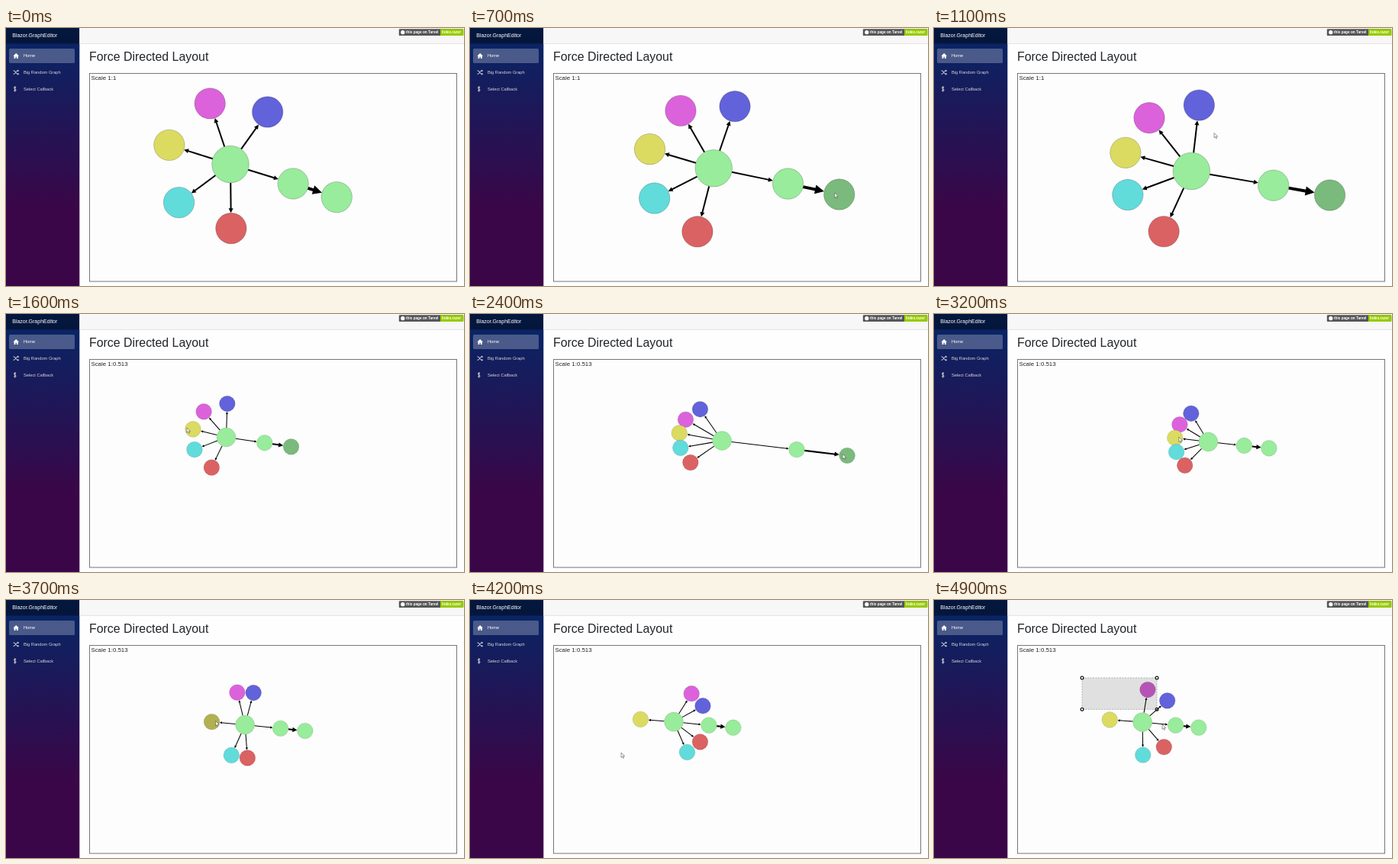
Write an HTML page that moves like this. It is 600x338 px and loops after 5 s.

```html
<!DOCTYPE html>
<html lang="en">
<head>
<meta charset="utf-8">
<title>Force Directed Layout</title>
<style>
html, body { margin: 0; width: 100%; height: 100%; overflow: hidden; background: #fefefe; }
svg { display: block; width: 100vw; height: 100vh; }
text { font-family: "Liberation Sans", Arial, sans-serif; }
.nav { font-size: 5.7px; fill: #d7d7d7; }
.badge { font-size: 4.7px; font-weight: bold; fill: #fff; }
</style>
</head>
<body>
<svg viewBox="0 0 600 338">
  <defs>
    <linearGradient id="side" x1="0" y1="0" x2="0" y2="1">
      <stop offset="0" stop-color="#052767"/>
      <stop offset=".7" stop-color="#3a0647"/>
    </linearGradient>
  </defs>
  <rect width="600" height="338" fill="#fefefe"/>
  <rect width="96.3" height="338" fill="url(#side)"/>
  <rect width="96.3" height="20.5" fill="#000" fill-opacity=".4"/>
  <text x="8.2" y="12.1" font-size="7" fill="#fff">Blazor.GraphEditor</text>
  <rect x="4" y="27" width="86" height="19" rx="1.6" fill="#fff" fill-opacity=".25"/>
  <path d="M9.4 36.8 13.2 33l3.8 3.8h-1.2v3.1h-1.9v-2.1h-1.4v2.1h-1.9v-3.1z" fill="#fff"/>
  <text class="nav" x="23" y="38.3" style="fill:#fff">Home</text>
  <g fill="none" stroke="#d7d7d7">
    <path d="M9.6 56h1.5l3.2 4.2h1.6M9.6 60.2h1.5l3.2-4.2h1.6"/>
    <path d="M13.2 77.8q-2.8-1.3-2.8.6c0 1.5 2.7 1.4 2.7 3q-.2 1.7-2.9.4M11.8 76.3v7.2"/>
  </g>
  <path d="M15.2 54.5l2 1.5-2 1.5zM15.2 58.7l2 1.5-2 1.5z" fill="#d7d7d7"/>
  <text class="nav" x="23" y="60.3">Big Random Graph</text>
  <text class="nav" x="23" y="82.3">Select Callback</text>

  <rect x="96.3" width="504" height="20.5" fill="#f7f7f7"/>
  <path d="M96.3 20.5H600" stroke="#d6d5d5" stroke-width=".6"/>
  <rect x="514.8" y="1.3" width="84.4" height="8.8" rx="1.2" fill="#555"/>
  <path d="M569 1.3h29q1.2 0 1.2 1.2v6.4q0 1.2-1.2 1.2h-29z" fill="#97ca00"/>
  <circle cx="519.8" cy="5.7" r="2.6" fill="#fff"/>
  <text class="badge" x="524" y="7.3">this page on Tarvel</text>
  <text class="badge" x="571" y="7.3">Index.razor</text>

  <text x="109" y="42.6" font-size="15.9" fill="#212529">Force Directed Layout</text>
  <rect x="109.5" y="59.5" width="481" height="272.5" fill="#fdfdfd" stroke="#777"/>
  <text id="scale" x="111.4" y="68.4" font-size="7.9" fill="#212529"></text>
  <g id="box">
    <rect fill="#808080" fill-opacity=".24" stroke="#999" stroke-width=".7" stroke-dasharray="2 1.5"/>
  </g>
  <g id="edges"></g>
  <g id="nodes"></g>
  <path id="cursor" d="M0 0V6.3L1.5 5 2.6 7.3 3.6 6.8 2.6 4.6H4.6Z" fill="#fff" stroke="#444" stroke-width=".55"/>
</svg>
<script>
const LOOP = 5000, STEP = 100;
const ZOOM = { x: 231, y: 133, start: 1100, steps: 13, rate: 0.027, factor: 0.95 };
const $ = id => document.getElementById(id);
const clamp = (v, lo = 0, hi = 1) => Math.max(lo, Math.min(hi, v));
const mix = (a, b, u) => a + (b - a) * u;
const linear = u => u;
const smooth = u => u * u * (3 - 2 * u);
const easeOut = u => 1 - (1 - u) ** 1.5;

function set(el, attrs) {
  for (const k in attrs) el.setAttribute(k, attrs[k]);
}
function make(tag, parent, attrs = {}) {
  const el = document.createElementNS("http://www.w3.org/2000/svg", tag);
  set(el, attrs);
  return parent.appendChild(el);
}

// Layout in unzoomed units: hub position, angles of the inner and outer
// leaf pairs from the middle leaf, and length of the hub's link to the chain
const poses = [
  { t: 0, x: 294, y: 178.5, inner: 54, outer: 108, link: 86 },
  { t: 1100, x: 337.3, y: 187.5, inner: 36, outer: 81, link: 109, wait: 200, ease: smooth },
  { t: 1600, x: 343, y: 188.5, inner: 35, outer: 78, link: 99, ease: linear },
  { t: 2400, x: 424, y: 197.3, inner: 20, outer: 45, link: 192, wait: 300, ease: smooth },
  { t: 3200, x: 481, y: 200.2, inner: 24.4, outer: 52, link: 92, ease: easeOut },
  { t: 4200, x: 301, y: 184.8, inner: 118, outer: 147, link: 90, ease: linear },
  { t: 4900, x: 313, y: 185.6, inner: 95, outer: 135, link: 85, ease: easeOut }
];

const node = (fill, r = 20.2, dark, ...held) => ({
  fill, r, dark, held, el: make("circle", $("nodes"), { stroke: "#000", "stroke-opacity": .25 })
});
const hub = node("#98ec9b", 24.3);
const pink = node("#db62db", 20.2, "#b554b5", 4800, 5000);
const blue = node("#6262db");
const yellow = node("#dbdb62", 20.2, "#b1b152", 3300, 4000);
const cyan = node("#62dbdb");
const red = node("#db6262");
const mid = node("#98ec9b");
const tail = node("#98ec9b", 20.2, "#7aba7c", 200, 2800);
const leaves = [red, cyan, yellow, pink, blue];
const nodes = [hub, mid, tail, ...leaves];

const edge = (from, to, width = 2) => ({
  from, to, width, line: make("line", $("edges"), { stroke: "#000" }), tip: make("path", $("edges"))
});
const edges = [...leaves, mid].map(n => edge(hub, n));
edges.push(edge(mid, tail, 4));

// Pointer stops; one with a node is an offset from that node
const stops = [
  { t: 0, x: 480, y: 252 },
  { t: 200, x: -6, y: -2, on: tail },
  { t: 900, x: -6, y: -2, on: tail },
  { t: 1100, x: 367, y: 137.5 },
  { t: 1300, x: ZOOM.x, y: ZOOM.y },
  { t: 1500, x: ZOOM.x, y: ZOOM.y },
  { t: 1600, x: 237, y: 149 },
  { t: 1900, x: -6, y: -2, on: tail },
  { t: 2500, x: -6, y: -2, on: tail },
  { t: 2750, x: 400, y: 222 },
  { t: 3200, x: 5, y: -1, on: yellow },
  { t: 3800, x: 5, y: -1, on: yellow },
  { t: 4000, x: 200, y: 226 },
  { t: 4200, x: 198, y: 200 },
  { t: 4500, x: 194, y: 102 },
  { t: 4800, x: 292, y: 143.3 },
  { t: 4900, x: 299, y: 163 }
];
const boxFrom = stops.at(-3), boxTo = stops.at(-2);
const boxRect = $("box").firstElementChild;
const handles = [0, 1, 2, 3].map(() =>
  make("circle", $("box"), { r: 1.9, fill: "#fff", stroke: "#111", "stroke-width": 1.2 }));

function span(list, t) {
  const i = list.findIndex(k => k.t > t);
  return i < 0 ? [list.at(-2), list.at(-1)] : [list[i - 1], list[i]];
}

function scaleAt(t) {
  return ZOOM.factor ** clamp(Math.floor((t - ZOOM.start) * ZOOM.rate), 0, ZOOM.steps);
}

function poseAt(t) {
  const [a, b] = span(poses, t), start = a.t + (b.wait || 0);
  const u = b.ease(clamp((t - start) / (b.t - start))), pose = {};
  for (const k of ["x", "y", "inner", "outer", "link"]) pose[k] = mix(a[k], b[k], u);
  return pose;
}

function put(n, from, degrees, length) {
  const a = degrees * Math.PI / 180;
  n.x = from.x + length * Math.cos(a);
  n.y = from.y + length * Math.sin(a);
}

function layout(t, scale) {
  const { x, y, inner, outer, link } = poseAt(t);
  const fan = 190.7 + 6.7 * Math.cos(Math.PI * t / 4600);
  const tilt = 5.3 + 11.9 * Math.exp(-t / 1150);
  hub.x = ZOOM.x + (x - ZOOM.x) * scale;
  hub.y = ZOOM.y + (y - ZOOM.y) * scale;
  put(mid, hub, tilt, link * scale);
  put(tail, mid, tilt, (0.66 * link + 3) * scale);
  leaves.forEach((n, i) => {
    const k = i - 2, turn = Math.sign(k) * [0, inner, outer][Math.abs(k)];
    const reach = 84 + (link - 86) * (0.25 - 0.03 * k * k);
    put(n, hub, fan + turn, reach * scale);
  });
}

function paint(n, t, scale) {
  const held = t >= n.held[0] && t < n.held[1];
  set(n.el, { cx: n.x, cy: n.y, r: n.r * scale, fill: held ? n.dark : n.fill, "stroke-width": .8 * scale });
}

function connect({ from, to, width, line, tip }, scale) {
  const dx = to.x - from.x, dy = to.y - from.y, len = Math.hypot(dx, dy);
  const ux = dx / len, uy = dy / len, h = 3 * width * scale, w = h / 2;
  const x = to.x - ux * to.r * scale, y = to.y - uy * to.r * scale;
  const bx = x - ux * h, by = y - uy * h;
  set(line, {
    x1: from.x + ux * from.r * scale, y1: from.y + uy * from.r * scale,
    x2: bx + ux, y2: by + uy, "stroke-width": width * scale
  });
  set(tip, { d: `M${x} ${y}L${bx - uy * w} ${by + ux * w}L${bx + uy * w} ${by - ux * w}Z` });
}

function movePointer(t) {
  const [a, b] = span(stops, t);
  const u = smooth(clamp((t - a.t) / (b.t - a.t)));
  const at = (s, k) => s[k] + (s.on ? s.on[k] : 0);
  const x = mix(at(a, "x"), at(b, "x"), u), y = mix(at(a, "y"), at(b, "y"), u);
  set($("cursor"), { transform: `translate(${x} ${y})`, visibility: t < STEP ? "hidden" : "visible" });
}

function drawBox(t) {
  const u = smooth(clamp((t - boxFrom.t) / (boxTo.t - boxFrom.t)));
  $("box").style.display = u > 0 ? "" : "none";
  const { x, y } = boxFrom, width = (boxTo.x - x) * u, height = (boxTo.y - y) * u;
  set(boxRect, { x, y, width, height });
  handles.forEach((h, i) => set(h, { cx: x + width * (i % 2), cy: y + height * (i >> 1) }));
}

function draw(t) {
  const scale = scaleAt(t);
  $("scale").textContent = "Scale 1:" + Number(scale.toFixed(3));
  layout(t, scale);
  for (const n of nodes) paint(n, t, scale);
  for (const e of edges) connect(e, scale);
  drawBox(t);
  movePointer(t);
}

function tick() {
  draw(Math.floor(performance.now() % LOOP / STEP) * STEP);
  requestAnimationFrame(tick);
}
tick();
</script>
</body>
</html>
```
